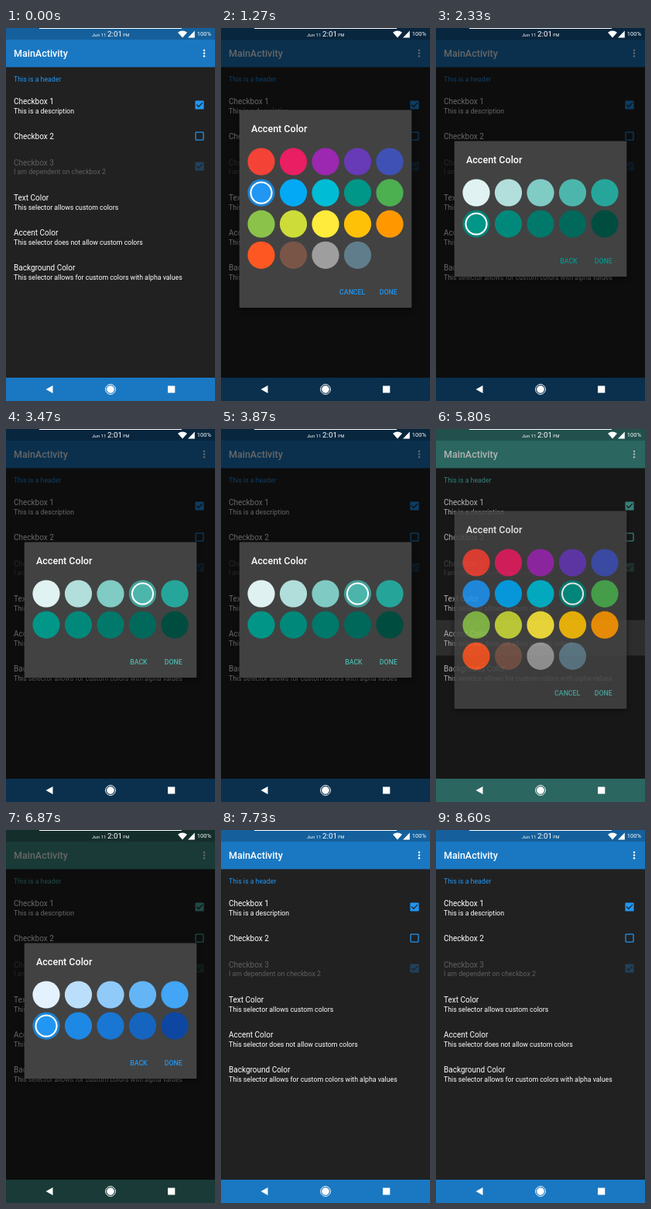
Recreate the animation shown at these times as an HTML page. Size 270 px wide and 480 px high, loop 9070 ms.

```html
<!DOCTYPE html>
<html lang="en">
<head>
<meta charset="utf-8">
<title>Color preferences</title>
<style>
  html, body { margin: 0; width: 100%; height: 100%; overflow: hidden; background: #212121; }
  svg { display: block; width: 100vw; height: 100vh; font-family: Roboto, sans-serif; }
  text { fill: #fff; white-space: pre; }
  .big { font-size: 12.5px; font-weight: 500; }
  .title { font-size: 10px; }
  .note { font-size: 8.75px; }
  .button { font-size: 8.75px; font-weight: 500; text-anchor: middle; }
  .accent { fill: var(--accent); }
  .pick { fill: var(--pick); }
  #sheet { fill: #424242; filter: drop-shadow(0 2px 3px rgba(0, 0, 0, .5)); }
</style>
</head>
<body>
<svg viewBox="0 0 270 480" preserveAspectRatio="none">
  <rect width="270" height="480" fill="#212121"/>
  <rect id="press" y="246" width="270" height="45.5" fill="#fff"/>
  <rect id="status" width="270" height="15"/>
  <rect class="bar" y="15" width="270" height="35.4"/>
  <rect class="bar" y="450" width="270" height="30"/>
  <text class="big" x="10" y="37">MainActivity</text>
  <g fill="#fff">
    <circle cx="256" cy="28.7" r="1.25"/><circle cx="256" cy="32.5" r="1.25"/><circle cx="256" cy="36.3" r="1.25"/>
  </g>
  <text class="note accent" x="10" y="69">This is a header</text>
  <g id="rows"></g>

  <rect id="dim" width="270" height="480"/>

  <g id="dialog">
    <rect id="sheet" x="23.7" width="222.6" rx="1.3"/>
    <g id="content"></g>
  </g>

  <g fill="#fff">
    <rect x="43" width="184" height="1"/>
    <text x="111" y="11.3" font-size="6.1">Jun 11</text>
    <text x="131" y="11.3" font-size="9.8">2:01</text>
    <text x="151.3" y="11.3" font-size="5.3">PM</text>
    <text x="246.8" y="10.3" font-size="7.5">100%</text>
    <path d="M222 5.8Q228 1.4 234 5.8L228 12.6ZM243.8 3.4V12.4H235Z"/>
    <path d="M51.5 465L60.5 460V470ZM209 460.5h9.3v9h-9.3z"/>
    <circle cx="135" cy="465" r="4.8"/>
    <circle cx="135" cy="465" r="6.4" fill="none" stroke="#fff"/>
  </g>
</svg>
<script>
const LOOP = 9070;
const BLUE = '#2196f3', TEAL = '#009688', LIGHT_TEAL = '#4db6ac';
const hexes = list => list.split(' ').map(h => '#' + h);
const PAGES = {
  all: hexes('f44336 e91e63 9c27b0 673ab7 3f51b5 2196f3 03a9f4 00bcd4 009688 4caf50 ' +
             '8bc34a cddc39 ffeb3b ffc107 ff9800 ff5722 795548 9e9e9e 607d8b'),
  blue: hexes('e3f2fd bbdefb 90caf9 64b5f6 42a5f5 2196f3 1e88e5 1976d2 1565c0 0d47a1'),
  teal: hexes('e0f2f1 b2dfdb 80cbc4 4db6ac 26a69a 009688 00897b 00796b 00695c 004d40')
};

// Dialog sessions: open and close times, then [time, page, selected, button colour].
const SESSIONS = [
  { open: 70, close: 3870, steps: [[0, 'all', BLUE, BLUE], [2130, 'teal', TEAL, TEAL], [3000, 'teal', LIGHT_TEAL, LIGHT_TEAL]] },
  { open: 5670, close: 7530, steps: [[0, 'all', TEAL, LIGHT_TEAL], [6600, 'blue', BLUE, BLUE]] }
];
const FADE = 200, DELAY = 30;

const $ = id => document.getElementById(id);
const clamp = v => Math.min(1, Math.max(0, v));
const ramp = (t, start, length) => clamp((t - start) / length);
const shade = (hex, k) =>
  `rgb(${[1, 3, 5].map(i => Math.round(parseInt(hex.slice(i, i + 2), 16) * k))})`;
const label = (cls, x, y, s) => `<text class="${cls}" x="${x}" y="${y}">${s}</text>`;

function checkbox(y, on) {
  return on
    ? `<rect class="accent" x="244.4" y="${y - 5.6}" width="11.2" height="11.2" rx="1.2"/>
       <path d="M246.1 ${y - .4}l2.7 2.7l5.1 -5.2" fill="none" stroke="#212121" stroke-width="1.25"/>`
    : `<rect x="245" y="${y - 5}" width="10" height="10" rx=".8" fill="none"
         stroke="var(--accent)" stroke-width="1.25"/>`;
}

$('rows').innerHTML = [
  label('title', 10, 98, 'Checkbox 1'), label('note', 10, 110, 'This is a description'), checkbox(99, true),
  label('title', 10, 143, 'Checkbox 2'), checkbox(139, false),
  '<g opacity=".28">', label('title', 10, 177, 'Checkbox 3'),
  label('note', 10, 188, 'I am dependent on checkbox 2'), checkbox(178, true), '</g>',
  label('title', 10, 222, 'Text Color'), label('note', 10, 233.5, 'This selector allows custom colors'),
  label('title', 10, 267, 'Accent Color'), label('note', 10, 279, 'This selector does not allow custom colors'),
  label('title', 10, 312, 'Background Color'),
  label('note', 10, 324, 'This selector allows for custom colors with alpha values')
].join('');

function swatch(color, i, top, selected) {
  const at = `cx="${52 + i % 5 * 41.5}" cy="${top + 66 + Math.floor(i / 5) * 40.1}"`;
  const disc = (r, fill) => `<circle ${at} r="${r}" fill="${fill}"/>`;
  return color === selected
    ? disc(17.6, shade(color, .87)) + disc(14.6, '#fff') + disc(12.5, color)
    : disc(17.6, color);
}

let shown;
function showPage(step) {
  if (step === shown) return;
  shown = step;
  const [, page, selected, pick] = step;
  const all = page === 'all';
  const top = all ? 106 : 146, height = all ? 254 : 174;
  $('sheet').setAttribute('y', top - .4);
  $('sheet').setAttribute('height', height + .4);
  $('dialog').style.setProperty('--pick', pick);
  $('content').innerHTML = label('big', 39, top + 28, 'Accent Color') +
    PAGES[page].map((c, i) => swatch(c, i, top, selected)).join('') +
    label('button pick', all ? 169.7 : 171.4, top + height - 17, all ? 'CANCEL' : 'BACK') +
    label('button pick', 216.3, top + height - 17, 'DONE');
}

let accent;
function setAccent(color) {
  if (color === accent) return;
  accent = color;
  document.documentElement.style.setProperty('--accent', color);
  document.querySelectorAll('.bar').forEach(b => b.setAttribute('fill', shade(color, .8)));
  $('status').setAttribute('fill', shade(color, .64));
}

function render(t) {
  const s = SESSIONS[t < 5000 ? 0 : 1];
  const enter = ramp(t, s.open + DELAY, FADE);
  const stay = 1 - ramp(t, s.close, FADE);
  showPage(s.steps.filter(step => step[0] <= t).pop());
  $('dialog').setAttribute('opacity', (1 - (1 - enter) ** 3) * stay);
  $('dim').setAttribute('opacity', .6 * enter * stay);
  $('press').setAttribute('opacity',
    .14 * ramp(t, s.open, 60) * (1 - ramp(t, s.open + 180, 200)));
  const [first, second] = SESSIONS;
  setAccent(t >= first.close + FADE && t < second.close + FADE ? LIGHT_TEAL : BLUE);
}

function tick() {
  render(performance.now() % LOOP);
  requestAnimationFrame(tick);
}
tick();
</script>
</body>
</html>
```
